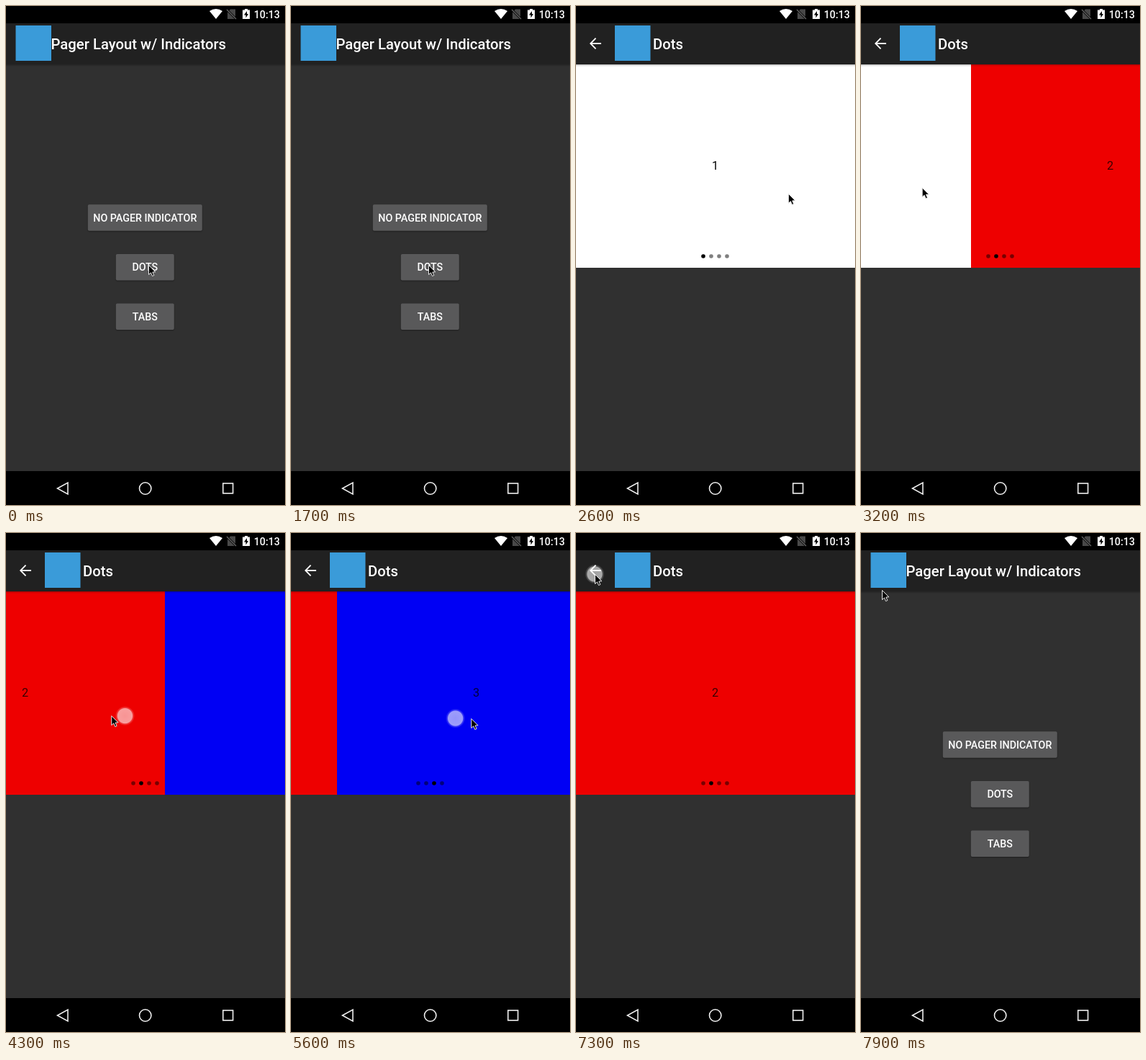
These frames come from a looping animation (388x692 px, 8000 ms). An HTML page with a canvas:

```html
<!DOCTYPE html>
<html lang="en">
<head>
<meta charset="utf-8">
<title>Pager Layout</title>
<style>
html, body { margin: 0; width: 100%; height: 100%; overflow: hidden; background: #000; }
canvas { display: block; width: 388px; height: 692px; }
</style>
</head>
<body>
<canvas id="stage" width="388" height="692"></canvas>
<script>
const ctx = document.getElementById('stage').getContext('2d');
const W = 388, H = 692, LOOP = 8000, STEP = 100;
const BAR_TOP = 24, BAR_END = 81, PAGER_END = 363, NAV_TOP = 645;
const PAGES = ['#ffffff', '#ee0000', '#0000f4'];
const TITLE = '500 20.3px', LABEL = '500 14.3px';
const OPEN = 1700, CLOSE = 7500;
const LAG = 16, SLOP = 8, SETTLE = 220, PRESS = 80;

// Each gesture moves the pointer on from where the last one left it.
const START = { x: 198, y: 359 };
const GESTURES = [
  { at: 850, ms: 150, x: 191, y: 359 },
  { at: 1400, ms: 200, x: 191, y: 359, press: true },
  { at: 2250, ms: 350, x: 295, y: 260 },
  { at: 2600, ms: 200, x: 340, y: 258 },
  { at: 2920, ms: 340, x: 64, y: 251, press: true, turn: 1 },
  { at: 3800, ms: 285, x: 340, y: 258 },
  { at: 4085, ms: 340, x: 64, y: 251, press: true, turn: 1 },
  { at: 4800, ms: 500, x: 157, y: 257 },
  { at: 5495, ms: 200, x: 330, y: 257, press: true, turn: -1 },
  { at: 5700, ms: 180, x: 261, y: 258 },
  { at: 6350, ms: 850, x: 26, y: 57 },
  { at: 7300, ms: 200, x: 26, y: 57, press: true },
  { at: 7600, ms: 300, x: 29, y: 79 }
];

const clamp = v => Math.min(1, Math.max(0, v));
const mix = (a, b, k) => a + (b - a) * k;
const ease = (t, at, ms) => (1 - Math.cos(Math.PI * clamp((t - at) / ms))) / 2;
const easeOut = k => 1 - (1 - clamp(k)) ** 3;

function pointer(t) {
  return GESTURES.reduce((p, g) => {
    const k = ease(t, g.at, g.ms);
    return { x: mix(p.x, g.x, k), y: mix(p.y, g.y, k) };
  }, START);
}

// The page follows the finger past the touch slop, then settles after release.
function scrollAt(t) {
  let scroll = 0;
  for (const g of GESTURES) {
    if (!g.turn || t < g.at) continue;
    const release = g.at + g.ms;
    const travel = Math.abs(pointer(Math.min(t, release) - LAG).x - pointer(g.at).x);
    const dragged = Math.max(0, travel - SLOP);
    scroll += g.turn * mix(dragged, W, easeOut((t - release) / SETTLE));
  }
  return scroll;
}

function rect(x, y, w, h, color) {
  ctx.fillStyle = color;
  ctx.fillRect(x, y, w, h);
}

function disc(x, y, r, color) {
  ctx.fillStyle = color;
  ctx.beginPath();
  ctx.arc(x, y, r, 0, Math.PI * 2);
  ctx.fill();
}

function text(str, x, y, font, color = '#fff', align = 'left') {
  ctx.font = font + ' Roboto, sans-serif';
  ctx.fillStyle = color;
  ctx.textAlign = align;
  ctx.fillText(str, x, y);
}

function poly(points, closed = true) {
  ctx.beginPath();
  points.forEach(([x, y]) => ctx.lineTo(x, y));
  if (closed) ctx.closePath();
}

function fillPoly(points, color) {
  poly(points);
  ctx.fillStyle = color;
  ctx.fill();
}

function strokePoly(points, color, width, closed) {
  poly(points, closed);
  ctx.strokeStyle = color;
  ctx.lineWidth = width;
  ctx.stroke();
}

function button(label, y, w) {
  const mid = 193.3;
  ctx.save();
  ctx.shadowColor = 'rgba(0,0,0,.4)';
  ctx.shadowBlur = 2;
  ctx.shadowOffsetY = 1;
  ctx.fillStyle = '#59595a';
  ctx.beginPath();
  ctx.roundRect(mid - w / 2, y, w, 36.5, 2);
  ctx.fill();
  ctx.restore();
  text(label, mid, y + 23.5, LABEL, '#fff', 'center');
}

function menu() {
  ['NO PAGER INDICATOR', 'DOTS', 'TABS'].forEach((label, i) => {
    button(label, 275.3 + i * 68.6, i ? 81 : 159);
  });
}

function pager(scroll, reveal) {
  ctx.save();
  ctx.globalAlpha = reveal;
  ctx.translate(0, (1 - reveal) * 45);
  rect(0, BAR_END, W, NAV_TOP - BAR_END, '#303030');
  PAGES.forEach((color, i) => {
    const x = Math.round(i * W - scroll);
    if (Math.abs(x) >= W) return;
    rect(x, BAR_END, W, PAGER_END - BAR_END, color);
    text(i + 1, x + 193.5, 227, '16.3px', i ? 'rgba(0,0,0,.75)' : '#000', 'center');
  });
  const current = Math.round(scroll / W);
  for (let i = 0; i < 4; i++) {
    disc(177 + i * 11, 347, 2.8, i === current ? '#000' : 'rgba(0,0,0,.5)');
  }
  ctx.restore();
}

function toolbar(inPager) {
  const shade = ctx.createLinearGradient(0, BAR_END, 0, BAR_END + 3);
  shade.addColorStop(0, 'rgba(0,0,0,.25)');
  shade.addColorStop(1, 'rgba(0,0,0,0)');
  rect(0, BAR_END, W, 3, shade);
  rect(0, BAR_TOP, W, BAR_END - BAR_TOP, '#212121');
  rect(inPager ? 54 : 13.5, 27, 49.5, 49, '#3a9bd9');
  if (inPager) {
    strokePoly([[35, 52], [20.5, 52]], '#fff', 1.8, false);
    strokePoly([[27.5, 44.7], [20.2, 52], [27.5, 59.3]], '#fff', 1.8, false);
  }
  text(inPager ? 'Dots' : 'Pager Layout w/ Indicators', inPager ? 107 : 62.5, 60, TITLE);
}

function statusBar() {
  rect(0, 0, W, BAR_TOP, '#000');
  ctx.fillStyle = '#fff';
  ctx.beginPath();
  ctx.moveTo(292, 18);
  ctx.lineTo(283, 7);
  ctx.quadraticCurveTo(292, .8, 301, 7);
  ctx.fill();
  fillPoly([[308, 9], [312, 4.5], [319, 4.5], [319, 18], [308, 18]], '#484848');
  strokePoly([[307, 5], [320, 18]], '#000', 3, false);
  strokePoly([[307, 5], [320, 18]], '#666', 1.2, false);
  rect(329, 5.5, 10, 12.5, '#fff');
  rect(332, 4, 4, 2, '#fff');
  fillPoly([[335, 7], [331, 12.5], [333.5, 12.5], [333.5, 16.5], [337, 11], [335, 11]], '#000');
  text('10:13', 381, 16.5, LABEL, '#fff', 'right');
}

function navBar() {
  rect(0, NAV_TOP, W, H - NAV_TOP, '#000');
  strokePoly([[71.5, 669], [86, 661], [86, 677]], '#eee', 1.6);
  ctx.beginPath();
  ctx.arc(193.7, 669, 8.2, 0, Math.PI * 2);
  ctx.stroke();
  ctx.strokeRect(301.8, 662, 13.8, 13.8);
}

function touch({ x, y }) {
  const glow = ctx.createRadialGradient(x, y, 0, x, y, 13.5);
  glow.addColorStop(0, 'rgba(255,255,255,.58)');
  glow.addColorStop(.75, 'rgba(255,255,255,.62)');
  glow.addColorStop(.82, 'rgba(255,255,255,.25)');
  glow.addColorStop(1, 'rgba(255,255,255,0)');
  disc(x, y, 13.5, glow);
}

function cursor({ x, y }) {
  const arrow = [[0, 0], [0, 13], [3, 10.3], [5, 15], [7.3, 14], [5.3, 9.5], [9.3, 9.3]];
  const points = arrow.map(([dx, dy]) => [x + dx + .5, y + dy + .5]);
  fillPoly(points, '#000');
  strokePoly(points, '#e8e8e8', 1);
}

function draw(t) {
  const reveal = ease(t, OPEN, 400) - ease(t, CLOSE, 300);
  const pressed = GESTURES.some(g => g.press && t >= g.at - (g.turn ? PRESS : 0) && t < g.at + g.ms);
  rect(0, 0, W, H, '#303030');
  if (reveal < 1) menu();
  if (reveal > 0) pager(scrollAt(t), reveal);
  toolbar(t > OPEN && t <= CLOSE);
  statusBar();
  navBar();
  if (pressed) touch(pointer(t - LAG));
  cursor(pointer(t));
}

function frame(now) {
  draw(Math.floor((now % LOOP) / STEP) * STEP);
  requestAnimationFrame(frame);
}

draw(0);
requestAnimationFrame(frame);
</script>
</body>
</html>
```
